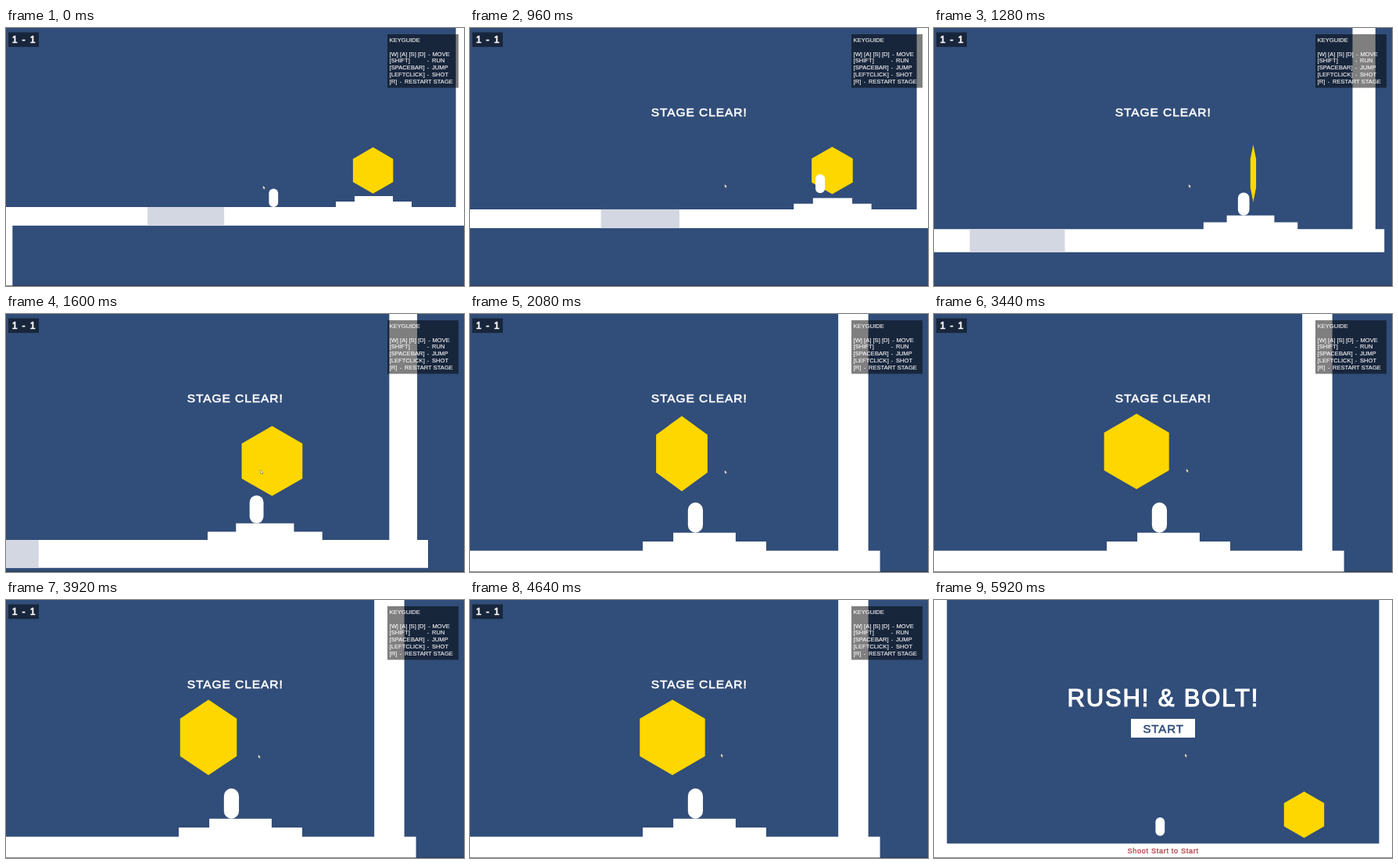
An HTML page that plays this animation: 586x330 px, repeating every 6 s.

```html
<!DOCTYPE html>
<html lang="en">
<head>
<meta charset="utf-8">
<title>Stage clear</title>
<style>
  html, body { margin: 0; width: 100%; height: 100%; overflow: hidden; background: #314d79; }
  svg { display: block; width: 586px; height: 330px; }
  text { font-family: "Liberation Sans", Arial, sans-serif; fill: #fff; white-space: pre; }
  .bold { letter-spacing: .06em; stroke: #fff; stroke-width: .038em; text-anchor: middle; }
  .guide { font-size: 7.6px; stroke: #fff; stroke-width: .1px; }
  .panel { fill: #000; fill-opacity: .5; }
  .blue { fill: #314d79; }
  .white { fill: #fff; }
  .gold { fill: #ffd700; }
</style>
</head>
<body>
<svg viewBox="0 0 586 330">
  <defs>
    <polygon id="hex" class="gold" points="0,-29.6 25.7,-14.8 25.7,14.8 0,29.6 -25.7,14.8 -25.7,-14.8"/>
    <rect id="hero" class="white" x="-5.9" y="-23.7" width="11.8" height="23.7" rx="5.9"/>
  </defs>

  <g id="stage">
    <rect class="blue" width="586" height="330"/>
    <g id="world">
      <path class="white" d="M0 229.1H422V222H446V215H495V222H519V229.1H575.6V-60H599.2V229.1H608.4V252.7H8.3V400H0Z"/>
      <rect x="181.1" y="229.1" width="98" height="23.6" fill="#d3d7e2"/>
      <use id="coin" href="#hex"/>
      <use id="player" href="#hero"/>
    </g>
    <rect class="panel" x="3" y="5.5" width="39" height="18.7"/>
    <text class="bold" x="23.3" y="18.5" font-size="12.4" style="letter-spacing:.1em;stroke-width:.06em">1 - 1</text>
    <rect class="panel" x="488" y="8" width="91" height="68.5"/>
    <g id="guide"></g>
    <text id="clear" class="bold" x="293.2" y="113.1" font-size="15.5">STAGE CLEAR!</text>
  </g>

  <g id="menu">
    <rect class="white" width="586" height="330"/>
    <rect class="blue" x="16.5" width="553" height="311.5"/>
    <text class="bold" x="293.4" y="135.8" font-size="31">RUSH! &amp; BOLT!</text>
    <rect class="white" x="252" y="152" width="82" height="24"/>
    <text class="bold" x="293.6" y="169.5" font-size="15" style="fill:#314d79;stroke:#314d79">START</text>
    <text class="bold" x="293.1" y="324.1" font-size="9.2" style="fill:#b04a50;stroke:#b04a50;letter-spacing:.07em">Shoot Start to Start</text>
    <use href="#hex" x="473.5" y="274.6"/>
    <use href="#hero" x="289.3" y="301.7"/>
  </g>

  <path id="cursor" d="M0 0V4.8L1.1 3.9L1.9 5.5L2.7 5.1L2 3.6H3.3Z" fill="#fff" stroke="#333" stroke-width=".4"/>
  <rect y="329" width="586" height="1" fill="#26303a" fill-opacity=".55"/>
</svg>
<script>
const LOOP = 6000, STEP = 80;
const TOUCH = 836, CAMERA_END = 1888, MENU = 5840;
const $ = id => document.getElementById(id);

// Key label, dash and action, each with its x.
const rows = [
  ["KEYGUIDE"], [],
  ["[W] [A] [S] [D]", 540.2, 545.5, "MOVE"],
  ["[SHIFT]", 538.7, 545, "RUN"],
  ["[SPACEBAR]", 538.7, 545, "JUMP"],
  ["[LEFTCLICK]", 538.7, 545, "SHOT"],
  ["[R]", 503.8, 510, "RESTART STAGE"]
];

function addText(x, y, str) {
  const el = document.createElementNS("http://www.w3.org/2000/svg", "text");
  el.setAttribute("class", "guide");
  el.setAttribute("x", x);
  el.setAttribute("y", y);
  el.textContent = str;
  $("guide").append(el);
}

rows.forEach(([key, dashX, actionX, action], i) => {
  const y = 18 + i * 8.75;
  if (key) addText(490.6, y, key);
  if (action) {
    addText(dashX, y, "-");
    addText(actionX, y, action);
  }
});

const clamp = v => Math.min(1, Math.max(0, v));
const smooth = v => v * v * (3 - 2 * v);
const mix = (a, b, k) => a + (b - a) * k;

// Linear interpolation over [time, x, y] points.
function along(points, t) {
  let i = 1;
  while (i < points.length - 1 && t > points[i][0]) i++;
  const [a, b] = [points[i - 1], points[i]];
  const k = clamp((t - a[0]) / (b[0] - a[0]));
  return [mix(a[1], b[1], k), mix(a[2], b[2], k)];
}

const cursorPath = [
  [0, 328.8, 201.4], [320, 325.8, 199.5], [2720, 325.8, 199.5],
  [3120, 322.8, 197.6], [4000, 322.8, 197.6], [4400, 321, 196.2]
];
const coinPath = [[0, 469.6, 182.2], [960, 470, 180.6], [1600, 476.5, 162.3]];

function heroAt(t) {
  const x = Math.min(463.4, 342.3 + t * 0.1174);
  const air = t - 420, span = 620, height = 45;
  const lift = air > 0 && air < span ? 4 * height * air * (span - air) / span ** 2 : 0;
  const ground = x > 440 ? 215 : 229.1;
  return [x, Math.min(ground, 229.1 - lift)];
}

// After the pickup the coin settles above the hero's shoulder.
function coinAt(t) {
  if (t <= 1600) return along(coinPath, t);
  const rest = t - 1600;
  return [445.3 + 31.2 * Math.exp(-rest / 333), 151.2 + 11.1 * Math.exp(-rest / 260)];
}

const place = (id, [x, y], extra = "") =>
  $(id).setAttribute("transform", `translate(${x} ${y}) ${extra}`);
const show = (id, on) => $(id).setAttribute("display", on ? "inline" : "none");

function draw(t) {
  const inMenu = t >= MENU;
  show("menu", inMenu);
  show("stage", !inMenu);
  show("clear", t >= TOUCH);

  const k = smooth(clamp((t - TOUCH) / (CAMERA_END - TOUCH)));
  place("world", [-466.3 * k, -70.5 * k], `scale(${1 + 0.6287 * k})`);
  const turn = Math.max(0, t - 1000) * 0.0052;
  place("coin", coinAt(t), `scale(${Math.abs(Math.cos(turn))} 1)`);
  place("player", heroAt(t));
  place("cursor", along(cursorPath, t));
}

const start = performance.now();
function tick() {
  const t = (performance.now() - start) % LOOP;
  draw(Math.floor(t / STEP) * STEP);
  requestAnimationFrame(tick);
}
tick();
</script>
</body>
</html>
```
